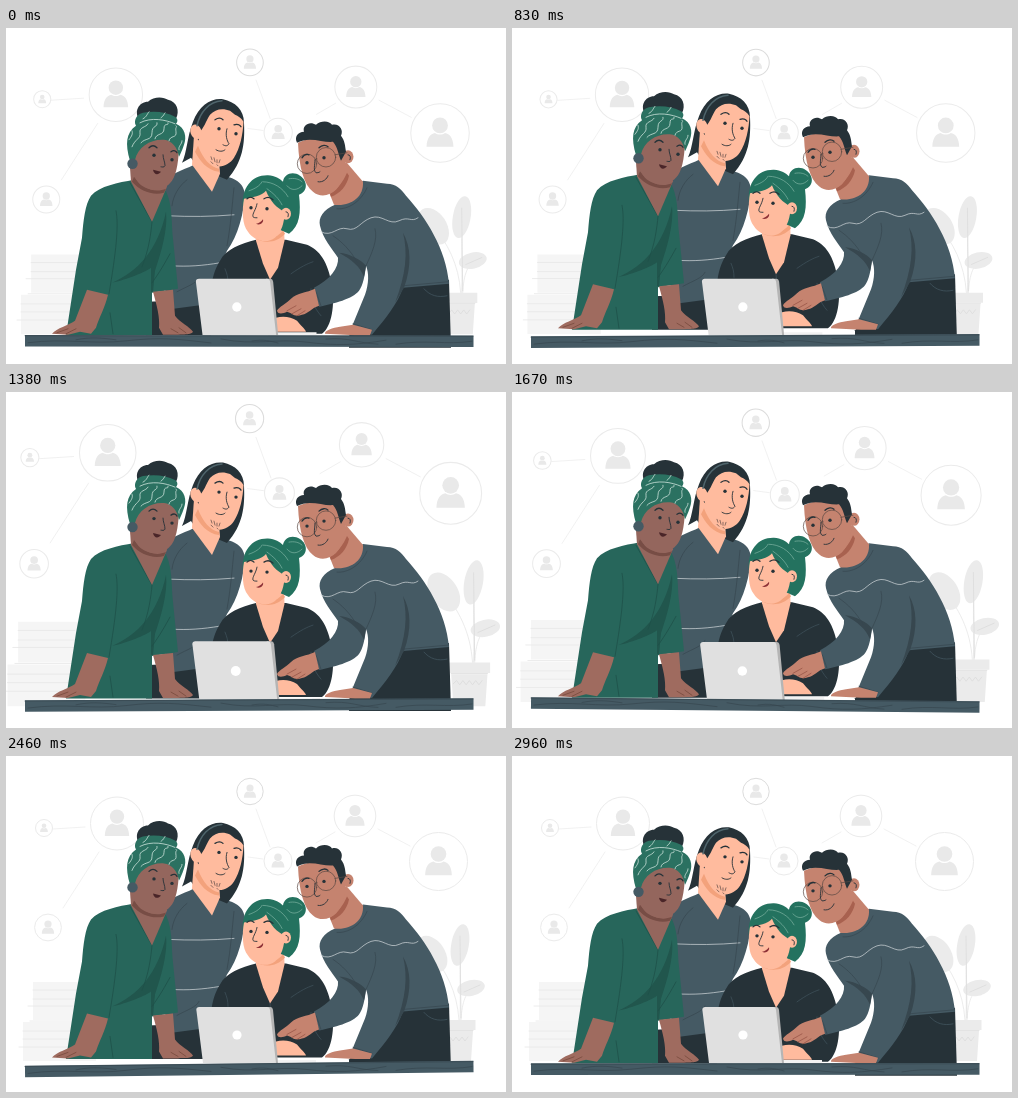
An HTML page that plays this animation: 500x336 px, repeating every 3 s.

```html
<!DOCTYPE html>
<html lang="en">
<head>
<meta charset="utf-8">
<title>Team at a laptop</title>
<style>
  html, body { margin: 0; width: 100%; height: 100%; overflow: hidden; background: #fff; }
  svg { display: block; width: 100%; height: 100%; }
  .line { fill: none; stroke-linecap: round; stroke-linejoin: round; }
  .ink { stroke: #263238; stroke-width: .9; }
  .brow { stroke: #263238; stroke-width: 1.3; }
  .fold { stroke: #37474f; stroke-width: .7; }
  .white { stroke: #d5dadd; stroke-width: .7; }
  .pale { stroke: #e8e8e8; stroke-width: .8; }
  .dark { fill: #263238; }
  .knit { fill: #455a64; }
  .green { fill: #27665b; }
  .deep { fill: #1f5149; }
  .brown { fill: #94665d; }
  .arm { fill: #9f6b5f; }
  .peach { fill: #ffbb9e; }
  .tan { fill: #c5836f; }
</style>
</head>
<body>
<svg viewBox="0 0 500 336" preserveAspectRatio="xMidYMid meet">
  <g id="backdrop">
    <g fill="#f5f5f5">
      <path d="M27 226H90V264H27ZM17 266H90V305H17Z"/>
      <path class="line pale" d="M27 234H80M22 250H80M27 243H80M17 275H80M13 291H80M17 283H80M24 265H80"/>
    </g>
    <path class="line pale" d="M454 264C455 235 453 220 455 190M455 264C456 245 460 236 468 231M453 264C451 235 440 215 424 195"/>
    <g fill="#ebebeb">
      <ellipse cx="454" cy="189" rx="8.8" ry="21" transform="rotate(10 454 189)"/>
      <ellipse cx="465" cy="232" rx="14" ry="8" transform="rotate(-12 465 232)"/>
      <ellipse cx="426" cy="198" rx="13" ry="20" transform="rotate(-33 426 198)"/>
      <path d="M431 264H469.500V274H431ZM433 275H467L465 305H435Z"/>
    </g>
    <path class="line" stroke="#dcdcdc" stroke-width=".8" d="M433 274.500H467M435 284l3 -3 3 4 3 -4 3 4 3 -4 3 4 3 -4 3 4 3 -4M455 262L454 180M458 236L474 229"/>
    <path class="line" stroke="#f0f0f0" stroke-width=".9" d="M47 73L79 71M93 96L57 152M250 53L264 91M242 101L257 103M310 87L329 76M372 73L404 90"/>
    <g id="contacts"></g>
  </g>

  <g class="people">
    <!-- long-haired man -->
    <path class="dark" d="M140 274L205 272V307.500H140Z"/>
    <path class="knit" d="M188 137C176 143 163 146 156 156L160 282L205 276L209 250L221 223C232 208 238 185 239 166C237 155 230 150 213 147Z"/>
    <path class="line white" d="M162 188C184 189 205 189 228 187M165 238C182 239 196 238 214 235"/>
    <path class="line fold" d="M228 160C226 178 225 196 221 218M181 152C173 158 167 168 166 178M171 264C182 258 190 256 193 250"/>
    <path class="dark" d="M176 135C181 125 181 109 187 94C193 78 205 70 217 71.500C229 74 238 82 238 95C239 116 237 134 221 152C205 145 190 140 185 130Z"/>
    <path class="peach" d="M188 108L186 137L206 164L214 146L213 132Z"/>
    <path fill="#f3a27c" d="M192 118C197 131 204 139 213 141L213 144C201 143 193 132 189 124Z"/>
    <ellipse class="peach" cx="190" cy="104" rx="5.500" ry="7.500" transform="rotate(-18 190 104)"/>
    <path class="peach" d="M204 87C209 81 217 80 224 83L229 87C232 88 235 90 237.500 94C237 106 234 121 228 130C222 139 211 142 203 134C196 128 193 116 192 106C198 101 200 93 204 87Z"/>
    <path class="line" stroke="#4f656c" stroke-width="1.500" d="M191 98C194 84 203 74 216 73"/>
    <path class="line brow" d="M209 92C212 90 215 90 217 92M228 97C231 96 234 97 235 99"/>
    <path class="line ink" d="M221 101C219 107 221 113 223 116C221 119 219 118 217 117M210 122C213 124 217 124 219 122"/>
    <path class="line" stroke="#5c4a45" stroke-width=".7" d="M205 129l1 3M208 130l1 4M211 132l0 3M214 132l-1 3M205 134l2 2M211 137l1 1"/>
    <circle class="dark" cx="213" cy="101" r="1.700"/><circle class="dark" cx="230" cy="106" r="1.700"/>

    <!-- woman in green -->
    <path class="green" d="M128 152C112 155 94 158 85 168C79 177 77.500 192 76 210L70 242L60 307.500H146V265L172 261L167 211C165 190 167 174 157 158Z"/>
    <path class="deep" d="M160 184C162 202 155 225 149 243L147 264L145 264V240C137 246 116 253 106 255C132 244 152 222 160 184Z" opacity=".75"/>
    <path class="line" stroke="#1f5149" stroke-width=".8" d="M124 155L146 194C145 205 143 222 136 239M110 183C113 197 110 225 103 266M146 255C154 244 159 235 164 226M104 285L107 306"/>
    <path class="arm" d="M81 262L102 267C99 280 93 290 90 300L85 306L74 304L62 307L46 306C51 300 62 298 69 293Z"/>
    <path class="arm" d="M147 264L167 262L169 288C174 295 184 299 187 304C184 308 176 306 172 307H157L153 300C154 290 151 278 147 264Z"/>
    <path class="line" stroke="#724539" stroke-width=".7" d="M51 305L62 301M60 306L70 301M165 301L172 305M173 300L180 305"/>
    <path class="brown" d="M124 140L125 154L146 194L161 159L157 143Z"/>
    <path fill="#774d45" d="M128 149C136 160 148 166 160 161L158 165C146 168 134 163 126 154Z"/>
    <path class="brown" d="M126 113C138 105 160 104 173 116C173 130 171 146 166 153C159 163 146 165 136 158C127 152 124 136 126 113Z"/>
    <path class="dark" d="M134 93C127 84 133 74 142 74C148 68 158 69 162 72C171 74 174 83 170 91C160 99 144 100 134 93Z"/>
    <path fill="#2b7161" d="M130 98C127 93 131 86 137 85C148 83 160 84 169 89C172 91 172 94 170 96C179 100 181 109 178 117C176 123 174 127 173 129C171 119 166 113 158 112C145 111 132 119 129 132L124 133C119 116 120 105 130 98Z"/>
    <path class="line" stroke="#cfe4dc" stroke-width=".8" d="M134 95C145 89 160 92 169 96M137 91C141 89 141 86 143 84M155 90C158 88 158 86 159 85M126 119C129 111 135 111 134 105S140 100 142 96M135 115C139 110 146 113 146 105S152 100 151 95M149 111C150 105 158 108 158 101S163 99 162 95M163 113C164 107 171 111 170 104S172 101 170 98M123 112C126 108 127 106 126 103M173 122C172 118 176 117 176 113"/>
    <circle cx="126.500" cy="136" r="5.200" fill="#455a64"/>
    <path class="line brow" d="M143 120C146 117 149 118 151 120M165 124C168 122 170 123 171 125"/>
    <path class="line ink" d="M157 127C157 131 159 134 159 138C158 140 156 139 155 139"/>
    <circle class="dark" cx="148" cy="127.500" r="1.700"/><circle class="dark" cx="166" cy="132" r="1.700"/>
    <path fill="#4a2528" d="M147 142C150 143 152 143 155 144C152 148 148 147 147 142Z"/>

    <!-- seated woman -->
    <path class="dark" d="M250 212C235 216 220 221 214 233C209 241 206 250 205 262L209 306H316C326 299 329 276 326 258C322 233 313 222 301 217L280 212Z"/>
    <path class="line" stroke="#455a64" stroke-width=".6" d="M305 261C304 270 308 280 315 288M219 241C221 246 222 249 222 255M285 246C295 239 301 236 307 234M264 252L265 263"/>
    <path class="peach" d="M250 207L250 213L257 236L264 252L272 240L278.500 213L278 198Z"/>
    <path fill="#24725f" d="M237 180C235 160 246 147 262 147.500C269 148 274 151 277 154C278 146 287 143 294 148C302 153 302 164 293 167C295 185 294 198 283 206L267 199Z"/>
    <path fill="#f3a27c" d="M249 208C260 213 270 211 277 203L279 206C271 215 259 216 250 211Z"/>
    <path class="peach" d="M238 171C246 170 256 168 260 163C264 173 271 181 279 184C278 195 276 204 269 210C260 217 247 212 242 204C236 197 236 182 238 171Z"/>
    <ellipse class="peach" cx="280" cy="186" rx="5" ry="6"/>
    <path class="line" stroke="#7fb3a3" stroke-width=".7" d="M257 154C267 154 277 160 282 169M261 161C268 166 273 171 276 177M243 163C249 161 254 158 256 154M281 158C285 163 291 163 296 158M283 151C288 150 293 151 296 154"/>
    <path class="line brow" d="M241 171C243 169 246 169 248 171M258 171C261 169 264 169 267 172"/>
    <path class="line ink" d="M251 176C250 182 246 186 247 189C248 190 249 190 251 190M280 184C282 184 283 186 282 189"/>
    <circle class="dark" cx="245" cy="180" r="1.700"/><circle class="dark" cx="261" cy="181" r="1.700"/>
    <path fill="#8c2f35" d="M250 196C253 195.500 255 194 257 191.500C258 195 254 198 250 196Z"/>
    <path class="peach" d="M270 290C277 288 285 289 291 293C295 298 299 301 300 304H270Z"/>
  </g>

  <g id="laptop">
    <path fill="#f2f2f2" d="M270 304H310V307H270Z"/>
    <path fill="#b5b5b5" d="M260 251H264C266 251 266.500 252 267 254L272 307H262Z"/>
    <path fill="#e0e0e0" d="M194 251H261C263 251 263.500 252 264 254L270 307H197L190.500 255C190 252 191 251 194 251Z"/>
    <circle cx="231" cy="279" r="4.600" fill="#fff"/>
  </g>

  <g class="people">
    <!-- man with glasses -->
    <path class="dark" d="M397 256L443 252L445 320H343V308L366 285Z"/>
    <path class="line" stroke="#455a64" stroke-width=".7" d="M418 261C424 268 432 270 441 268"/>
    <path class="knit" d="M329 177C317 182 312 190 314 198C317 211 326 221 332 230C333 240 324 252 308 260L313 279C328 276 347 271 353 263C357 258 359 247 360 238C363 245 363 256 359 267L345 301L366 307C380 290 391 277 397 260L443 256C440 221 420 190 400 168C395 161 390 156 381 156L357 153Z"/>
    <path fill="#37474f" d="M397 205C405 219 406 238 398 260L389 275C400 247 402 225 397 205ZM333 225C346 232 354 239 358 249L360 238C355 232 344 226 333 225Z"/>
    <path class="line white" d="M315 204C326 210 331 198 341 201S354 194 365 190C376 186 383 198 393 193S405 195 412 190"/>
    <path class="line fold" d="M331 181C342 182 355 174 361 160M327 208C336 214 344 222 351 234M369 201C372 212 366 225 360 238M309 262C312 268 313 273 315 278M397 258L442 254M347 296L366 302"/>
    <path class="tan" d="M309 261L313 278C306 280 302 286 296 287C288 290 286 285 281 284C277 286 272 287 271 283C273 279 280 276 285 271C291 265 301 265 309 261Z"/>
    <path class="line" stroke="#924f43" stroke-width=".7" d="M281 283L290 278M286 286L295 281M291 288L299 283"/>
    <path class="tan" d="M347 297L366 302L364 307.500H349L319 306C318 303 327 300 334 299Z"/>
    <path class="tan" d="M340 134L357 154C358 169 345 179 328 177L322 162Z"/>
    <path fill="#a8614f" d="M324 166C332 161 337 154 341 145L343 148C341 158 334 166 325 169Z"/>
    <path class="tan" d="M292 115C306 108 326 108 338 121C342 137 338 154 330 162C324 168 314 170 307 164C298 157 293 140 292 115Z"/>
    <ellipse class="tan" cx="342" cy="129" rx="5.500" ry="6.500"/>
    <path class="dark" d="M291 115C288 109 292 104 298 104C296 97 304 93 310 97C315 92 324 93 326 97C333 95 338 102 335 108C339 113 339 118 340 124L335 133C332 126 332 120 327 114C317 115 303 108 291 115Z"/>
    <g class="line" stroke="#594842" stroke-width=".7">
      <circle cx="301" cy="136" r="9.700"/><circle cx="320" cy="129.500" r="9.700"/>
      <path d="M310 132C310 130 311 130 311 131M329 127L341 125"/>
    </g>
    <path class="line brow" d="M296 130C298 127 300 126 303 127M313 120C316 117 320 117 322 119"/>
    <path class="line ink" d="M309 132C309 138 307 142 310 145C311 145 313 145 314 144M312 154C317 155 321 151 322 148M342 127C344 127 345 129 344 132"/>
    <circle class="dark" cx="301" cy="135" r="1.700"/><circle class="dark" cx="318" cy="130" r="1.700"/>
  </g>

  <g id="desk">
    <rect x="19" y="307.200" width="448.500" height="11.600" fill="#455a64"/>
    <path class="line fold" d="M19 308H467M22 315C60 310 85 317 120 313S170 311 205 315M70 312C84 309 96 310 110 312M215 311C250 318 270 310 300 314S350 317 380 312M320 311C345 309 350 315 372 316M390 316C420 311 440 317 466 313M246 313C258 311 264 313 272 315"/>
  </g>
</svg>
<script>
const LOOP = 3000, FRAME = LOOP / 72, LEAD = 25, LIFT = 6.67;
const byId = id => document.getElementById(id);
const people = document.querySelectorAll('.people');

const contacts = [
  [38, 72, 8.5], [111, 67.5, 26.5], [244, 35.5, 13.2], [272, 105, 14],
  [349, 60, 20.8], [432.5, 105.5, 29], [42, 171.5, 13.4]
];
byId('contacts').innerHTML = contacts.map(([x, y, r]) => `
  <circle cx="${x}" cy="${y}" r="${r}" fill="#fff" stroke="${r === 13.2 ? '#dcdcdc' : '#ebebeb'}"/>
  <g transform="translate(${x} ${y}) scale(${r})" fill="#e9e9e9">
    <circle cy="-.26" r=".27"/>
    <path d="M-.46 .47C-.45 .16 -.33 .03 -.17 0C-.08 .07 .08 .07 .17 0C.33 .03 .45 .16 .46 .47Z"/>
  </g>`).join('');

// Linear interpolation through [position, value] stops
function track(stops, p) {
  const i = stops.findIndex(([at]) => at > p);
  const [a, from] = stops[i - 1], [b, to] = stops[i];
  return from + (to - from) * (p - a) / (b - a);
}

const beat = [[0, 1], [.1, 1.1], [.3, 1], [.4, 1], [.5, 1.1], [.6, 1], [1, 1]];
const sway = [[0, 0], [.25, 1], [.75, -1], [1, 0]];
const bob = [[0, 0], [.5, -LIFT], [1, 0]];

const zoom = (s, x, y) => `translate(${x} ${y}) scale(${s}) translate(${-x} ${-y})`;

function draw(ms) {
  const frame = Math.floor((ms % LOOP + 5) / FRAME);
  const t = (frame * FRAME + LEAD) % LOOP;
  const half = t % (LOOP / 2) / (LOOP / 2);
  const scale = track(beat, t / LOOP);
  byId('backdrop').setAttribute('transform', zoom(scale, 250, 168));
  byId('laptop').setAttribute('transform', zoom(scale, 250, 279));
  byId('desk').setAttribute('transform', `rotate(${track(sway, half)} 243.2 313.2)`);
  people.forEach(g => g.setAttribute('transform', `translate(0 ${track(bob, half)})`));
}

const start = performance.now();
function tick() {
  draw(performance.now() - start);
  requestAnimationFrame(tick);
}
tick();
</script>
</body>
</html>
```
